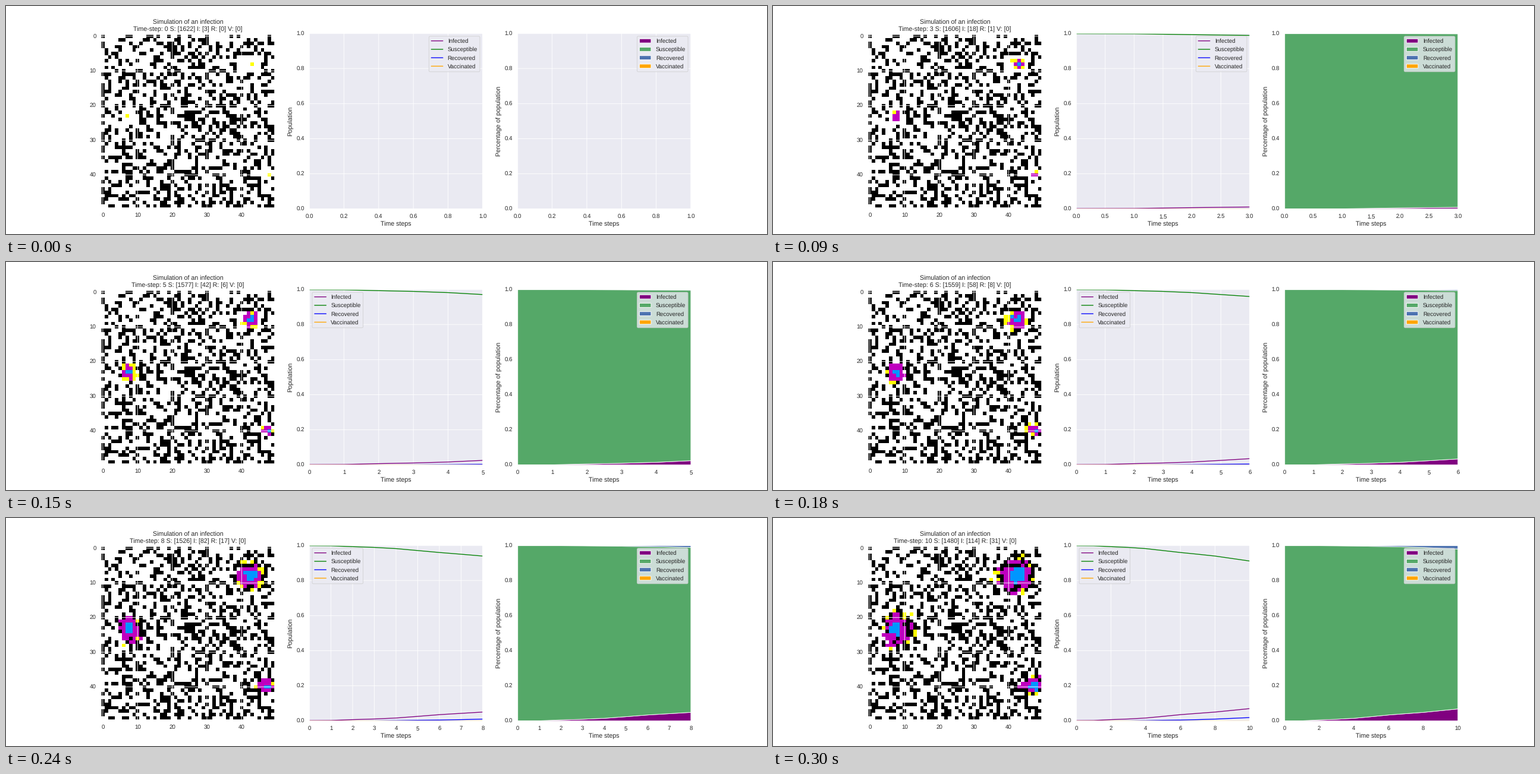
Write a matplotlib script that moves like this. It is 1280x384 px and loops after 0.33 s.

```python
import numpy as np
import matplotlib.pyplot as plt
from matplotlib.animation import FuncAnimation
from matplotlib.colors import ListedColormap

plt.rcParams.update({
    "font.family": "Liberation Sans", "font.size": 12,
    "axes.titlesize": 12, "axes.labelsize": 12,
    "xtick.labelsize": 11, "ytick.labelsize": 11, "legend.fontsize": 11,
    "text.color": ".15", "axes.labelcolor": ".15",
    "xtick.color": ".15", "ytick.color": ".15",
    "axes.facecolor": "#EAEAF2", "axes.edgecolor": "white",
    "axes.linewidth": 1.25, "axes.axisbelow": True,
    "axes.grid": True, "grid.color": "white", "grid.linewidth": 1,
    "xtick.bottom": False, "ytick.left": False,
    "xtick.major.size": 6, "ytick.major.size": 6,
    "lines.linewidth": 1.5, "lines.solid_capstyle": "round",
    "patch.linewidth": 1, "patch.edgecolor": "w", "patch.force_edgecolor": True,
    # soft, unrounded text and lines
    "text.hinting": "no_hinting", "path.snap": False,
})

N = 50
PEOPLE = 1625
STEPS = 11

# Totals at key steps; the steps between are interpolated
KEY_STEPS = [0, 1, 3, 4, 6, 8, 10]
KEY_SICK = [3, 4, 19, 30, 66, 99, 145]
KEY_RECOVERED = [0, 0, 1, 3, 8, 17, 31]

# Outbreaks: row, column, reach up, down, left, right
OUTBREAKS = [(8, 43, 6, 5.5, 7, 4.5), (23, 7, 5, 6.5, 3.5, 6.5),
             (40, 48, 3.5, 2.5, 6, 2)]


def totals(values):
    return np.rint(np.interp(np.arange(STEPS), KEY_STEPS, values)).astype(int)


def ranks(score):
    """Position of every cell when sorted by score."""
    rank = np.empty(N * N, int)
    rank[np.argsort(score, axis=None, kind="stable")] = np.arange(N * N)
    return rank.reshape(N, N)


def outbreak_distance():
    """Distance to the nearest outbreak, relative to its reach."""
    rows, cols = np.mgrid[:N, :N]
    nearest = np.full((N, N), np.inf)
    for r, c, up, down, left, right in OUTBREAKS:
        dy, dx = rows - r, cols - c
        reach = np.hypot(dy / np.where(dy < 0, up, down),
                         dx / np.where(dx < 0, left, right))
        nearest = np.minimum(nearest, reach)
    return nearest


sick = totals(KEY_SICK)
recovered = totals(KEY_RECOVERED)
vaccinated = np.zeros(STEPS, int)
infected = sick - recovered
susceptible = PEOPLE - sick

rng = np.random.RandomState(7)
distance = outbreak_distance()

wall_score = rng.rand(N, N) + (distance < 0.45)
wall_score[22:25, 24:27] = -1
walls = ranks(wall_score) < N * N - PEOPLE

ill_score = distance * (0.8 + 0.4 * rng.rand(N, N))
ill_score[walls] = np.inf
ill_rank = ranks(ill_score)
heal_rank = ranks(ill_rank / 60 + 0.3 * rng.rand(N, N))

NAMES = ["Infected", "Susceptible", "Recovered", "Vaccinated"]
SERIES = np.array([infected, susceptible, recovered, vaccinated]) / PEOPLE
LINE_COLORS = ["purple", "green", "blue", "orange"]
AREA_COLORS = ["purple", "#55A868", "#4C72B0", "orange"]
CELLS = ListedColormap(["white", "black", "yellow", "#BF00BF", "#0096FF"])

fig, (grid_ax, line_ax, area_ax) = plt.subplots(1, 3, figsize=(20, 6), dpi=64)


def draw_grid(t):
    before = sick[t - 1] if t else 0
    state = walls.astype(int)
    state[ill_rank < sick[t]] = 3
    state[(ill_rank >= before) & (ill_rank < sick[t])] = 2
    state[heal_rank < recovered[t]] = 4
    grid_ax.imshow(state, cmap=CELLS, vmin=0, vmax=4, interpolation="nearest")
    grid_ax.set_title(
        "Simulation of an infection\n"
        f"Time-step: {t} S: [{susceptible[t]}] I: [{infected[t]}] "
        f"R: [{recovered[t]}] V: [{vaccinated[t]}]")


def finish(ax, t, ylabel, loc):
    ax.set(xlim=(0, max(t, 1)), ylim=(0, 1), xlabel="Time steps", ylabel=ylabel)
    ax.legend(loc=loc)


def draw(t):
    for ax in (grid_ax, line_ax, area_ax):
        ax.clear()
    draw_grid(t)
    x = np.arange(t + 1)
    for y, name, color in zip(SERIES, NAMES, LINE_COLORS):
        line_ax.plot(x, y[:t + 1], color=color, label=name)
    finish(line_ax, t, "Population", "upper right" if t < 4 else "upper left")
    area_ax.stackplot(x, SERIES[:, :t + 1], labels=NAMES, colors=AREA_COLORS)
    finish(area_ax, t, "Percentage of population", "upper right")


anim = FuncAnimation(fig, draw, frames=STEPS, interval=30, repeat=True)
plt.show()
```
